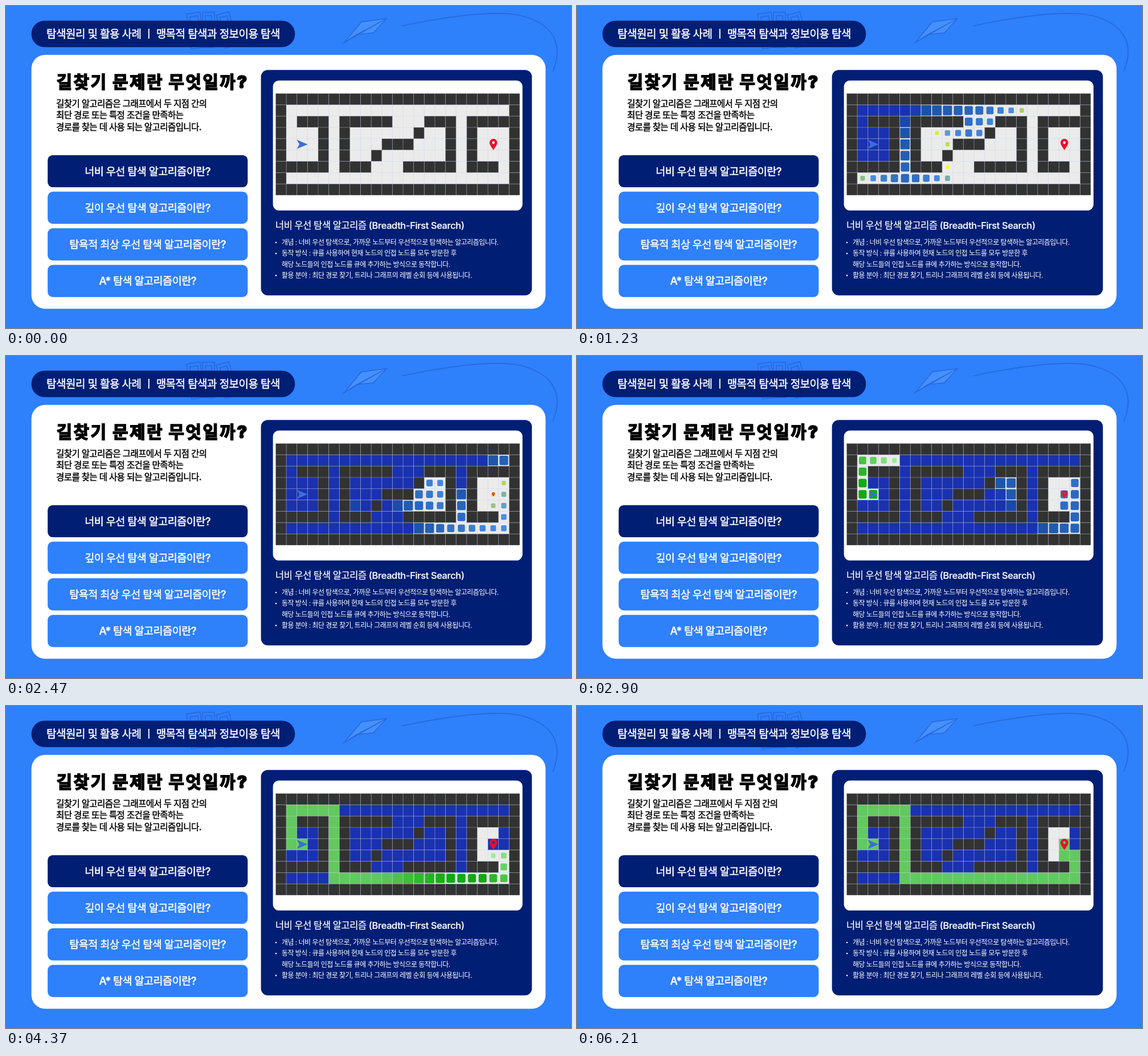
An HTML page with a canvas that plays this animation: 992 by 565 pixels, repeating every 6.25 s.

```html
<!DOCTYPE html>
<html lang="ko">
<head>
<meta charset="utf-8">
<style>
html, body { margin: 0; width: 100%; height: 100%; overflow: hidden; background: #2e80fb; }
canvas { display: block; width: 992px; height: 565px; }
</style>
</head>
<body>
<canvas id="stage" width="992" height="565"></canvas>
<script>
const ctx = document.getElementById('stage').getContext('2d');
const LOOP = 6250;
const FONT = 'Inter, "Noto Sans CJK KR", "Noto Sans CJK", sans-serif';
const NAVY = '#001e74', BLUE = '#2e80fb', LINE = '#2868dc';

// Maze
const MAZE = [
  '#######################',
  '#.....................#',
  '#.###.#####...###.#####',
  '#...#.#......#..#.#...#',
  '#...#.#...###...#.#...#',
  '#...#.#..#......#.#...#',
  '#####.###...#####.###.#',
  '#.....................#',
  '#######################'
];
const COLS = 23, ROWS = 9;
const X0 = 473.5, Y0 = 153.5, CW = 428.5 / COLS, CH = 178.5 / ROWS;
const START = [2, 4], GOAL = [20, 4];
const isWall = (c, r) => MAZE[r][c] === '#';
const key = (c, r) => r * COLS + c;

function search() {
  const order = [START], seen = new Set([key(...START)]);
  for (let i = 0; i < order.length; i++) {
    const [c, r] = order[i];
    for (const [dc, dr] of [[0, -1], [1, 0], [0, 1], [-1, 0]]) {
      const n = [c + dc, r + dr], k = key(...n);
      if (isWall(...n) || seen.has(k)) continue;
      seen.add(k);
      order.push(n);
      if (k === key(...GOAL)) return order;
    }
  }
  return order;
}

// Joins corner cells into a list of single steps
function walk(corners) {
  const out = [corners[0]];
  for (const [tc, tr] of corners.slice(1)) {
    let [c, r] = out[out.length - 1];
    while (c !== tc || r !== tr) {
      c += Math.sign(tc - c);
      r += Math.sign(tr - r);
      out.push([c, r]);
    }
  }
  return out;
}

const timeline = (cells, time) => new Map(cells.map(([c, r], i) => [key(c, r), time(i)]));
const route = walk([START, [1, 4], [1, 1], [5, 1], [5, 7], [21, 7], [21, 5], [20, 5], GOAL]);
const visitAt = timeline(search(), i => 30 + 24.45 * i + 1.75 * Math.max(0, i - 49));
const routeAt = timeline(route, i => 2475 + 56.8 * i);

// Progress from 0 to 1 between two ages
const part = (age, from, to) => Math.min(1, Math.max(0, (age - from) / (to - from)));
const mix = (a, b, p) => a.map((v, i) => v + (b[i] - v) * p);

// A cell pops up small, grows, then settles into a full square
const VISIT = {
  scale: age => .3 + .2 * part(age, 0, 150) + .5 * part(age, 150, 850) ** 1.2,
  colors: [[248, 255, 0], [72, 142, 230], [26, 84, 170], [26, 49, 176]],
  stops: [0, 170, 780, 860]
};
const ROUTE = {
  scale: age => .38 + .38 * (1 - (1 - part(age, 0, 350)) ** 2) + .24 * part(age, 400, 730),
  colors: [[168, 245, 164], [16, 171, 16], [16, 171, 16], [98, 201, 94]],
  stops: [0, 300, 500, 850]
};

function colorAt({ colors, stops }, age) {
  const rgb = colors.reduce((c, next, i) => i ? mix(c, next, part(age, stops[i - 1], stops[i])) : next);
  return `rgb(${rgb.map(Math.round)})`;
}

function box(x, y, w, h, r, fill) {
  ctx.beginPath();
  ctx.roundRect(x, y, w, h, r);
  ctx.fillStyle = fill;
  ctx.fill();
}

// Static panel with a soft outer edge
const plate = (x, y, w, h, r, fill) => box(x - .35, y - .35, w + .7, h + .7, r, fill);

function poly(points, fill, stroke, width = 1) {
  ctx.beginPath();
  points.forEach(([x, y], i) => i ? ctx.lineTo(x, y) : ctx.moveTo(x, y));
  ctx.closePath();
  if (fill) { ctx.fillStyle = fill; ctx.fill(); }
  if (stroke) { ctx.strokeStyle = stroke; ctx.lineWidth = width; ctx.stroke(); }
}

// y is the middle of the line
function text(str, x, y, size, { weight = 400, color = '#fff', gap = 0, align = 'left', bold = 0 } = {}) {
  ctx.font = `${weight} ${size}px ${FONT}`;
  ctx.letterSpacing = gap + 'px';
  ctx.textAlign = align;
  ctx.fillStyle = ctx.strokeStyle = color;
  const base = y + size * .37;
  ctx.fillText(str, x, base);
  if (bold) {
    ctx.lineWidth = bold;
    ctx.strokeText(str, x, base);
  }
}

function book(x, y, w, h, angle) {
  ctx.save();
  ctx.translate(x, y);
  ctx.rotate(angle);
  ctx.strokeStyle = LINE;
  ctx.lineWidth = 1.6;
  ctx.strokeRect(0, 0, w, h);
  ctx.strokeRect(5, 6, w - 10, 9);
  ctx.restore();
}

function decor() {
  book(317, 14, 24, 62, -.14);
  book(345, 11, 21, 62, 0);
  book(369, 16, 23, 60, -.26);

  const nose = [594, 64], tail = [668, 22];
  poly([nose, [624, 28], tail, [645, 47], [616, 50]], '#4590ff', LINE, 1.4);
  poly([nose, tail, [616, 50]], '#3a86f8', LINE, 1.2);

  ctx.beginPath();
  ctx.moveTo(695, 35);
  ctx.bezierCurveTo(770, 19, 850, 8, 895, 15);
  ctx.bezierCurveTo(955, 26, 982, 62, 960, 115);
  ctx.strokeStyle = LINE;
  ctx.lineWidth = 1.7;
  ctx.stroke();
}

function leftSide() {
  text('길찾기 문제란 무엇일까?', 88.5, 132.5, 30, { weight: 900, color: '#000', gap: 2.4, bold: 1.6 });
  [
    '길찾기 알고리즘은 그래프에서 두 지점 간의',
    '최단 경로 또는 특정 조건을 만족하는',
    '경로를 찾는 데 사용 되는 알고리즘입니다.'
  ].forEach((s, i) => text(s, 88, 171 + 20.5 * i, 15.5, { weight: 500, color: '#000', gap: -.56, bold: .45 }));
  [
    '너비 우선 탐색 알고리즘이란?',
    '깊이 우선 탐색 알고리즘이란?',
    '탐욕적 최상 우선 탐색 알고리즘이란?',
    'A* 탐색 알고리즘이란?'
  ].forEach((s, i) => {
    const y = 262 + 64.2 * i;
    plate(73.5, y, 350.5, 55.7, 9, i ? BLUE : NAVY);
    text(s, 248.7, y + 28, 18.5, { weight: 500, gap: -.5, align: 'center', bold: .5 });
  });
}

function panelText() {
  text('너비 우선 탐색 알고리즘 (Breadth-First Search)', 473, 385, 16.5, { weight: 500, gap: -.4, bold: .2 });
  [
    '개념 : 너비 우선 탐색으로, 가까운 노드부터 우선적으로 탐색하는 알고리즘입니다.',
    '동작 방식 : 큐를 사용하여 현재 노드의 인접 노드를 모두 방문한 후',
    '해당 노드들의 인접 노드를 큐에 추가하는 방식으로 동작합니다.',
    '활용 분야 : 최단 경로 찾기, 트리나 그래프의 레벨 순회 등에 사용됩니다.'
  ].forEach((s, i) => {
    const y = 414.7 + 19.3 * i;
    text(s, 484, y, 12, { gap: -.54 });
    if (s.includes(':')) box(472.8, y - 1, 2.6, 2.6, 1.3, '#fff');
  });
}

function mark(age, look, cx, cy) {
  const s = look.scale(age), w = CW * s, h = CH * s;
  const radius = .2 * w * (1 - part(s, .75, 1));
  box(cx - w / 2, cy - h / 2, w, h, radius, colorAt(look, age));
  return s;
}

function arrow() {
  poly([[-9.5, -8], [9.6, 0], [-9.5, 8], [-5, 0]], '#3b6fd6');
}

function pin() {
  ctx.beginPath();
  ctx.moveTo(0, 10.3);
  ctx.bezierCurveTo(-2, 6, -6.8, 1.5, -6.8, -3);
  ctx.arc(0, -3, 6.8, Math.PI, 0);
  ctx.bezierCurveTo(6.8, 1.5, 2, 6, 0, 10.3);
  ctx.closePath();
  ctx.moveTo(2.4, -3);
  ctx.arc(0, -3, 2.4, 0, Math.PI * 2);
  ctx.fillStyle = '#e8112d';
  ctx.fill('evenodd');
}

function gridLines() {
  ctx.beginPath();
  for (let c = 0; c <= COLS; c++) {
    ctx.moveTo(X0 + c * CW, Y0);
    ctx.lineTo(X0 + c * CW, Y0 + ROWS * CH);
  }
  for (let r = 0; r <= ROWS; r++) {
    ctx.moveTo(X0, Y0 + r * CH);
    ctx.lineTo(X0 + COLS * CW, Y0 + r * CH);
  }
  ctx.strokeStyle = 'rgba(200,204,232,.5)';
  ctx.lineWidth = .8;
  ctx.stroke();
}

function maze(t) {
  const icons = [];
  ctx.fillStyle = '#ebebeb';
  ctx.fillRect(X0, Y0, COLS * CW, ROWS * CH);
  for (let r = 0; r < ROWS; r++) {
    for (let c = 0; c < COLS; c++) {
      const k = key(c, r), cx = X0 + (c + .5) * CW, cy = Y0 + (r + .5) * CH;
      let scale = 1;
      if (isWall(c, r)) {
        box(cx - CW / 2, cy - CH / 2, CW, CH, 0, '#323232');
      } else if (t >= routeAt.get(k)) {
        scale = mark(t - routeAt.get(k), ROUTE, cx, cy);
      } else if (t >= visitAt.get(k)) {
        scale = mark(t - visitAt.get(k), VISIT, cx, cy);
      }
      if (k === key(...START)) icons.push([arrow, cx, cy, scale]);
      if (k === key(...GOAL)) icons.push([pin, cx + .3, cy, scale]);
    }
  }
  gridLines();
  for (const [draw, x, y, s] of icons) {
    ctx.save();
    ctx.translate(x, y);
    ctx.scale(s, s);
    draw();
    ctx.restore();
  }
}

function render(t) {
  ctx.fillStyle = BLUE;
  ctx.fillRect(0, 0, 992, 565);
  decor();
  plate(45, 26, 462, 46, 23, NAVY);
  text('탐색원리 및 활용 사례 ㅣ 맹목적 탐색과 정보이용 탐색', 71, 48.5, 19, { weight: 500, gap: -.5, bold: .45 });
  plate(45, 86, 902, 445, 24, '#fff');
  leftSide();
  plate(448, 112.5, 475, 395, 12, NAVY);
  plate(469, 131, 437.5, 227.5, 11, '#fff');
  maze(t);
  panelText();
}

const begin = performance.now();
function tick() {
  render((performance.now() - begin) % LOOP);
  requestAnimationFrame(tick);
}
tick();
</script>
</body>
</html>
```
